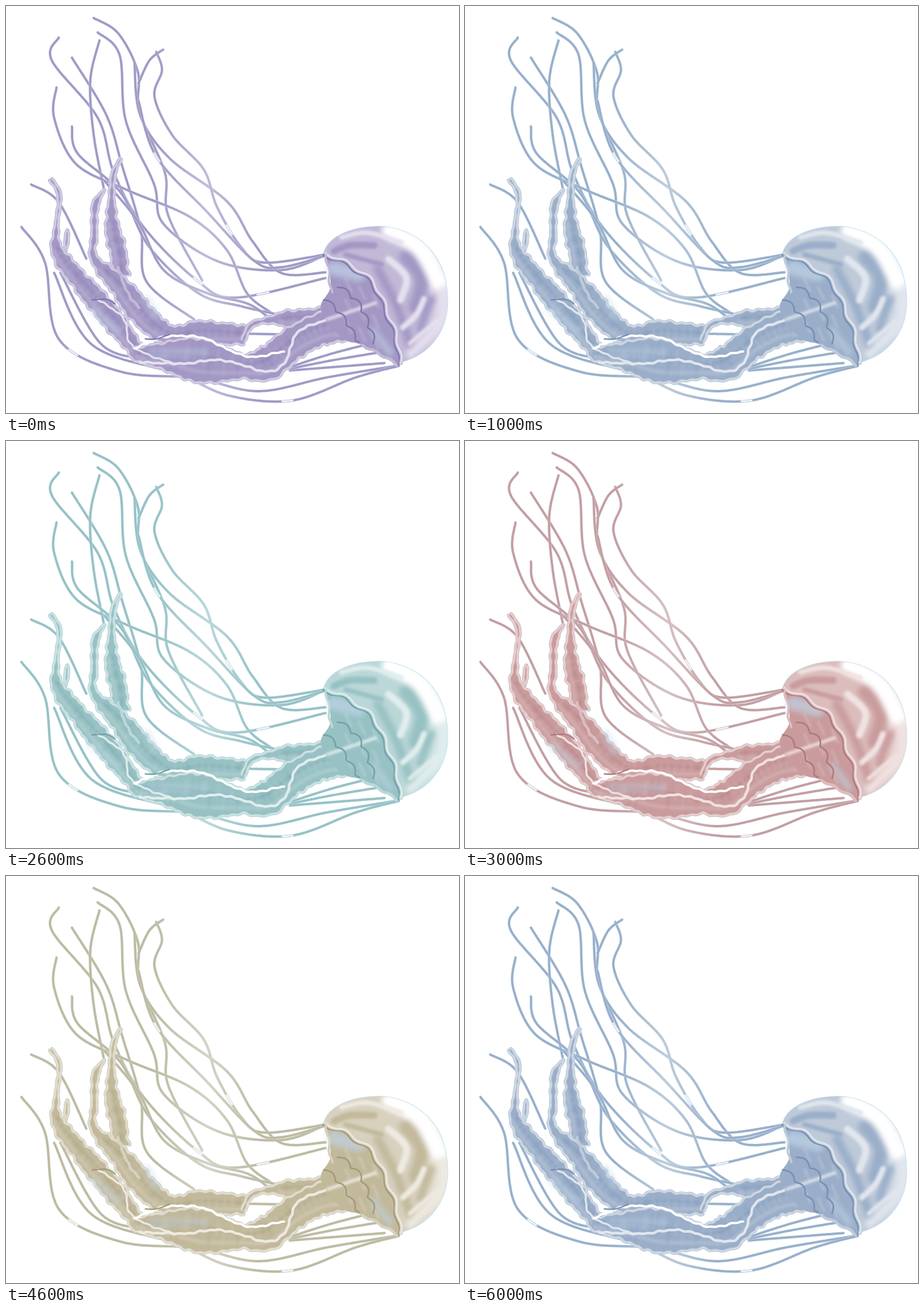
Animation, 790 px wide and 709 px high, one loop 7 s. Source, as an HTML page:

```html
<!DOCTYPE html>
<html lang="en">
<head>
<meta charset="utf-8">
<title>Jellyfish</title>
<style>
  html, body { margin: 0; width: 100%; height: 100%; overflow: hidden; background: #fff; }
  svg { display: block; width: 790px; height: 709px; }
  path { fill: none; stroke-linecap: round; stroke-linejoin: round; }
</style>
</head>
<body>
<svg id="stage" viewBox="0 0 790 709" xmlns="http://www.w3.org/2000/svg">
  <defs>
    <linearGradient id="strand" gradientUnits="userSpaceOnUse" x1="60" y1="0" x2="560" y2="0">
      <stop offset=".4" style="stop-color:var(--base)"/>
      <stop offset=".58" style="stop-color:var(--light)"/>
      <stop offset=".76" style="stop-color:var(--base)"/>
    </linearGradient>
    <linearGradient id="dome" gradientUnits="userSpaceOnUse" x1="620" y1="480" x2="770" y2="460">
      <stop offset=".5" style="stop-color:var(--light)"/>
      <stop offset="1" style="stop-color:var(--pale)"/>
    </linearGradient>
    <filter id="soft" filterUnits="userSpaceOnUse" x="0" y="0" width="790" height="709"><feGaussianBlur stdDeviation="2"/></filter>
    <filter id="softer" filterUnits="userSpaceOnUse" x="0" y="0" width="790" height="709"><feGaussianBlur stdDeviation="5"/></filter>
    <clipPath id="bellClip"></clipPath>
  </defs>
</svg>
<script>
const stage = document.getElementById('stage');
const BASE = 'var(--base)', DARK = 'var(--dark)', LIGHT = 'var(--light)', PALE = 'var(--pale)';
const HALO = '#c3e3f1', SKY = '#bfd3e6';

function make(parent, tag, attrs = {}) {
  const el = document.createElementNS('http://www.w3.org/2000/svg', tag);
  for (const k in attrs) el.setAttribute(k, attrs[k]);
  return parent.appendChild(el);
}
const group = (attrs, parent = stage) => make(parent, 'g', attrs);
const fill = (g, d, color) => make(g, 'path', { d, style: `fill:${color}` });
const stroke = (g, d, color, width, opacity = 1) =>
  make(g, 'path', { d, style: `stroke:${color}`, 'stroke-width': width, opacity });

// Spline through "x,y[,width] ..." sampled about every 3 px, with normals and arc length
function sample(text) {
  const p = text.split(' ').map(s => s.split(',').map(Number));
  const at = i => p[Math.max(0, Math.min(p.length - 1, i))];
  const out = [];
  for (let i = 0; i < p.length - 1; i++) {
    const [a, b, c, e] = [at(i - 1), at(i), at(i + 1), at(i + 2)];
    const n = Math.ceil(Math.hypot(c[0] - b[0], c[1] - b[1]) / 3);
    for (let k = i ? 1 : 0; k <= n; k++) {
      const t = k / n;
      const [x, y, w] = b.map((v, j) => v + t / 2 * (c[j] - a[j]
        + t * (2 * a[j] - 5 * v + 4 * c[j] - e[j] + t * (3 * (v - c[j]) + e[j] - a[j]))));
      out.push({ x, y, w });
    }
  }
  let len = 0;
  out.forEach((q, i) => {
    const a = out[Math.max(0, i - 1)], b = out[Math.min(out.length - 1, i + 1)];
    const h = Math.hypot(b.x - a.x, b.y - a.y) || 1;
    q.nx = (a.y - b.y) / h;
    q.ny = (b.x - a.x) / h;
    if (i) len += Math.hypot(q.x - a.x, q.y - a.y);
    q.s = len;
  });
  return out;
}

const shift = (q, o) => `${(q.x + q.nx * o).toFixed(1)},${(q.y + q.ny * o).toFixed(1)}`;
const trace = (pts, offset = () => 0) => 'M' + pts.map(q => shift(q, offset(q))).join('L');
const wobble = q => 1.2 * Math.sin(q.s / 2.9) + Math.sin(q.s / 4.7 + 1) + .8 * Math.sin(q.s / 11);
const line = (g, text, color, width, opacity) => stroke(g, trace(sample(text)), color, width, opacity);
const wave = (g, text, color, width, amp, step) =>
  stroke(g, trace(sample(text), q => amp * Math.sin(q.s / step)), color, width);

let seed = 7;
const rnd = () => (seed = seed * 16807 % 2147483647) / 2147483647;

function drawStrands() {
  const g = group();
  const paths = [
    '153,21 196,48 230,115 233,185 277,290 283,365 342,478',
    '160,46 198,85 209,200 258,310 275,380 370,445 480,460 557,434',
    '224,98 234,190 285,265 385,340 430,410 480,465 557,464',
    '262,80 272,112 259,158 290,225 345,285 368,350 410,420 450,447 557,433',
    '274,76 250,95 231,135',
    '231,165 262,262 350,358 433,444 480,455 557,435',
    '92,55 80,95 160,195 188,290 240,385 333,478 400,508 557,474',
    '115,90 175,190 203,280 235,390 245,480 328,546',
    '163,60 147,130 153,225 171,320',
    '88,142 84,195 122,275 210,320 320,367 385,425 420,500 462,534',
    '115,210 125,257 200,325 250,420 335,500 410,523 468,536',
    '172,305 230,375 275,460 350,500 420,518 455,540',
    '44,311 92,342 140,440',
    '27,385 68,447 92,580 200,637 330,648 440,671 560,647 685,626',
    '84,465 150,590 300,641 390,679 500,687 610,647 685,627',
    '95,465 165,588 240,615',
    '425,571 480,572'
  ];
  for (let k = 0; k < 3; k++) paths.push(`495,${635 - k * 3} 570,${629 - k * 12} 660,${622 - k * 20}`);
  const strands = paths.map(sample);
  for (const s of strands) {
    stroke(g, trace(s), HALO, 5.2, .7);
    stroke(g, trace(s), 'url(#strand)', 3.8);
  }
  // White glints on the strand nearest to each point
  for (const [x, y] of [[262, 264], [400, 385], [333, 478], [448, 502], [490, 686], [118, 603]]) {
    const dist = q => Math.hypot(q.x - x, q.y - y);
    const near = s => s.reduce((m, q, i) => dist(q) < dist(s[m]) ? i : m, 0);
    const s = strands.reduce((m, c) => dist(c[near(c)]) < dist(m[near(m)]) ? c : m);
    const i = near(s);
    stroke(g, trace(s.slice(Math.max(0, i - 3), i + 4)), '#fff', 3, .85);
  }
}

// Frilled band of varying width along a spine
function ribbon(halo, arms, text) {
  const pts = sample(text);
  const edge = side => q => side * (q.w / 2 - 1 + wobble(q) * Math.min(1, q.w / 20));
  const left = trace(pts, edge(-1)), right = trace(pts, edge(1));
  const body = left + trace([...pts].reverse(), edge(1)).replace('M', 'L') + 'Z';
  stroke(halo, body, HALO, 5.5, .8);
  fill(arms, body, BASE);
  const soft = group({ filter: 'url(#soft)' }, arms);
  const wide = pts.filter(q => q.w > 22);
  if (wide.length) {
    stroke(soft, trace(wide, q => q.w * .24), LIGHT, 6, .5);
    stroke(soft, trace(wide, q => q.w * -.1), DARK, 4, .45);
    for (let i = 0; i < wide.length; i += 4) {
      const q = wide[i], a = rnd() * .4;
      stroke(soft, `M${shift(q, -a * q.w)}L${shift(q, (.4 - a) * q.w)}`, rnd() < .6 ? LIGHT : DARK, 2.5, .4);
    }
  }
  for (const d of [left, right]) {
    stroke(arms, d, LIGHT, 4.6);
    stroke(arms, d, PALE, 1.4, .8);
  }
}

function drawArms() {
  const halo = group(), arms = group();
  for (const spine of [
    '107,390,3 106,405,9 104,427,3',
    '200,266,5 187,295,9 184,345,13 186,390,28 196,430,29 200,470,32',
    '172,320,3 156,347,13 154,400,11 154,440,16 200,490,38 240,540,44 285,573,36 345,570,44 416,573,32',
    '78,302,7 93,330,8 88,385,8 90,428,24 128,478,34 178,536,40 234,608,28',
    '414,582,8 428,556,10 460,547,14 500,545,32 570,545,40',
    '222,606,20 300,612,64 345,619,78 412,628,46 456,622,60 500,588,56 552,562,58 602,560,46'
  ]) ribbon(halo, arms, spine);

  const crest = (text, color, width) => stroke(arms, trace(sample(text), q => wobble(q) * .6), color, width);
  crest('196,455 212,500 232,525', LIGHT, 5);
  crest('160,510 205,545 222,594 300,625', PALE, 3.5);
  crest('224,596 281,576 345,579 418,610 485,602', '#fff', 4);
  crest('233,620 305,623 378,617 450,636 486,622 512,566 600,535', PALE, 4.5);
  line(arms, '150,512 175,511 190,519', DARK, 2.5);
  line(arms, '243,580 262,580 285,572', DARK, 2.5);
  const tint = group({ filter: 'url(#softer)' }, arms);
  for (const patch of ['150,530 195,565', '255,604 345,604', '245,510 262,542']) line(tint, patch, SKY, 14, .4);
}

function drawBell() {
  const under = group();
  const rim = '557,430 600,450 640,480 662,523 683,580 688,622';
  fill(under, trace(sample(rim)) + trace(sample('684,627 625,592 585,578 549,528 566,488 557,430')).replace('M', 'L') + 'Z', BASE);
  const glow = group({ filter: 'url(#softer)' }, under), soft = group({ filter: 'url(#soft)' }, under);
  line(glow, '572,457 615,468', SKY, 24, .7);
  line(glow, '640,565 670,604', SKY, 12, .6);
  for (let k = 0; k < 9; k++) {
    const x = 592 + k % 3 * 24, y = 475 + k % 3 * 14 + Math.floor(k / 3) * 36;
    line(soft, `${x},${y} ${x + 10},${y + 22}`, LIGHT, 4, .6);
  }
  line(soft, '560,546 590,536 645,517', PALE, 5);
  // Rows of dark scallops
  for (const row of ['631,448 660,478 690,538', '578,490 615,525 640,588', '554,512 585,545 612,588'])
    stroke(under, trace(sample(row), q => -7 * Math.abs(Math.sin(q.s / 9.5))), DARK, 2.8);

  const dome = 'M555,428C565,398 610,384 650,384S770,410 770,515C770,560 745,605 690,620'
    + trace(sample(rim).reverse()).replace('M', 'L') + 'Z';
  stroke(under, dome, HALO, 2);
  fill(under, dome, 'url(#dome)');
  make(document.getElementById('bellClip'), 'path', { d: dome });
  const shade = group({ 'clip-path': 'url(#bellClip)' });
  const broad = group({ filter: 'url(#softer)' }, shade), fine = group({ filter: 'url(#soft)' }, shade);
  line(broad, '648,458 680,520 705,590', BASE, 15);
  line(broad, '698,437 724,475 714,525', BASE, 25);
  line(broad, '742,510 722,562', BASE, 14);
  line(broad, '670,392 722,422 755,480', '#fff', 30);
  line(broad, '763,495 758,550 705,607', PALE, 15);
  line(fine, '572,427 600,417 642,417', BASE, 12);
  line(fine, '592,433 655,450', BASE, 8);
  line(fine, '585,403 630,395 690,412', PALE, 8);
  line(fine, '667,441 698,473 688,512', PALE, 12);
  line(fine, '729,510 716,537 692,560', PALE, 10);
  line(fine, '752,548 704,588', PALE, 7);

  const front = group();
  wave(group({ transform: 'translate(-4 3)' }), rim, DARK, 3, 3, 8);
  stage.appendChild(front);
  wave(front, rim, LIGHT, 6.5, 3, 8);
  wave(front, rim, PALE, 2.8, 3, 8);
  wave(front, '558,433 563,465 567,499', LIGHT, 4, 2, 6);
  wave(front, '622,591 662,612 682,625', LIGHT, 5, 1.5, 5);
}

// base, dark, light, pale
const tints = [
  ['#a398c4', '#8377ad', '#c2b9d7', '#e5e0ee'],
  ['#9aaec9', '#7891b3', '#bfcad9', '#e1e6ee'],
  ['#97c1c3', '#72a3ab', '#bbd7d8', '#e0eded'],
  ['#c99b9c', '#b07a7e', '#dcbdbd', '#f0e2e1'],
  ['#c2b99b', '#a59b7a', '#d8d1bf', '#eeeae1']
];
const roles = ['--base', '--dark', '--light', '--pale'];
let shown = -1;

function render(ms) {
  const i = Math.floor(ms % 7000 / 1000) % tints.length;
  if (i === shown) return;
  shown = i;
  roles.forEach((role, k) => stage.style.setProperty(role, tints[i][k]));
}

drawStrands();
drawArms();
drawBell();
render(0);
const start = performance.now();
function tick() {
  render(performance.now() - start);
  requestAnimationFrame(tick);
}
requestAnimationFrame(tick);
</script>
</body>
</html>
```
